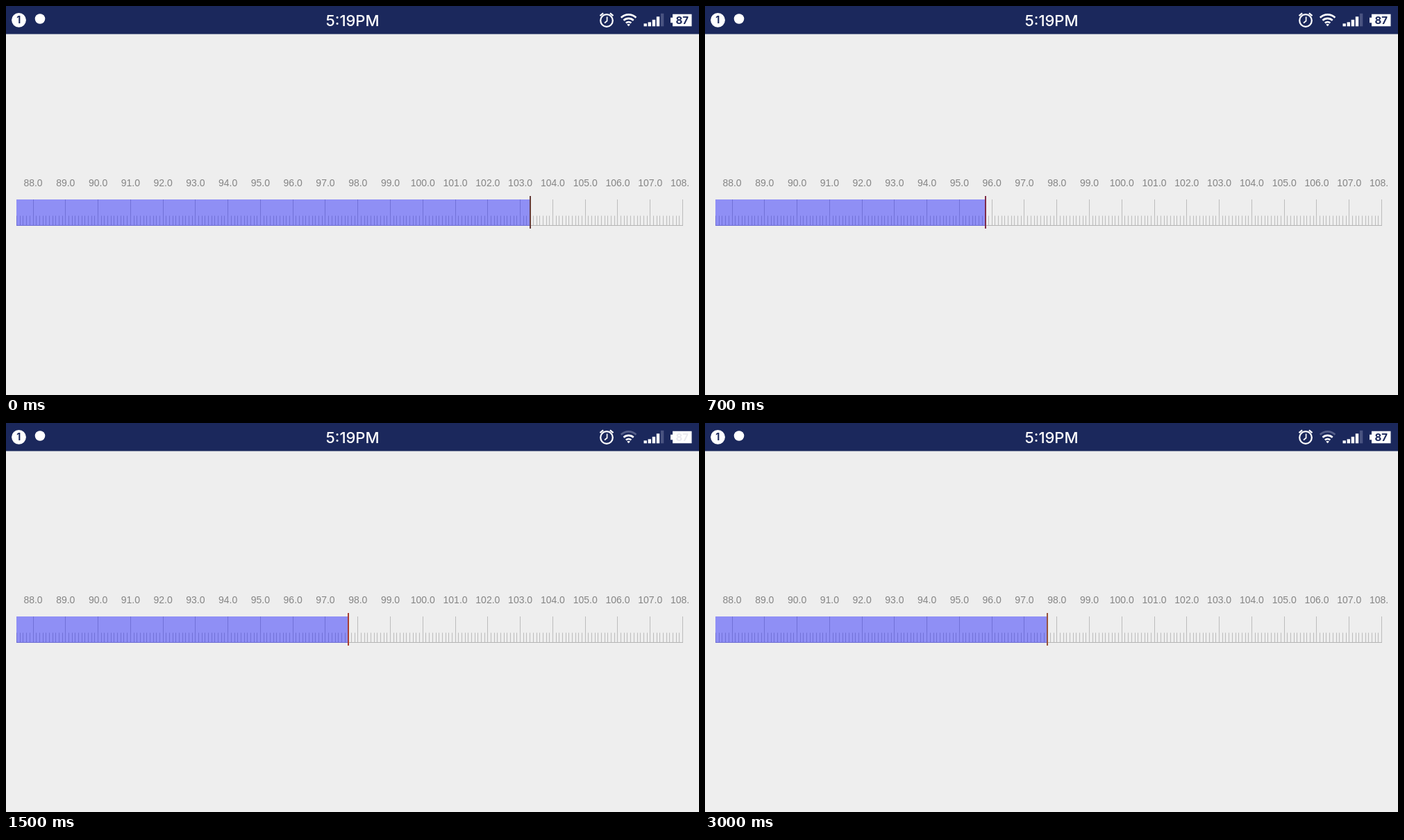
Write an HTML page that moves like this. It is 998 by 561 pixels and loops after 3.4 s.

```html
<!DOCTYPE html>
<html lang="en">
<head>
<meta charset="utf-8">
<title>Tuner scale</title>
<style>
  html, body { margin: 0; width: 100%; height: 100%; overflow: hidden; background: #eee; }
  svg { display: block; width: 998px; height: 561px; }
  .time { font: 500 22px Inter, sans-serif; }
  .badge { font: 700 14px Inter, sans-serif; }
  .charge { font: 700 15px Inter, "Liberation Sans", sans-serif; }
  .labels { font: 14px "Liberation Sans", Arial, sans-serif; fill: #858585; }
  text { text-anchor: middle; }
</style>
</head>
<body>
<svg viewBox="0 0 998 561">
  <defs><clipPath id="view"><rect x="15" y="240" width="968" height="30"/></clipPath></defs>
  <rect width="998" height="561" fill="#eee"/>

  <rect width="998" height="40.5" fill="#1b285c"/>
  <g fill="#fff">
    <circle cx="18.5" cy="20.3" r="10.4"/>
    <text class="badge" x="18.3" y="25.3" fill="#1b285c">1</text>
    <circle cx="49" cy="18.5" r="7.3"/>
    <text class="time" x="499" y="28.6">5:19PM</text>
  </g>

  <g fill="none" stroke="#fff" stroke-width="2.2">
    <circle cx="865" cy="21" r="8.8"/>
    <path d="M855.5 14.2l4.6-3.9M874.5 14.2l-4.6-3.9"/>
    <path d="M865.6 15.5v6l-3.6 3" stroke-width="1.7"/>
  </g>

  <g fill="none" stroke="#fff" stroke-width="2.6">
    <path id="outer" d="M885.8 16.8a15.5 15.5 0 0 1 21.6 0"/>
    <path d="M889.5 20.8a10.2 10.2 0 0 1 14.2 0"/>
    <path d="M892.9 24.5a5.2 5.2 0 0 1 7.4 0"/>
    <path d="M896.6 29.3l-2.3-2.6a3.4 3.4 0 0 1 4.6 0z" fill="#fff" stroke="none"/>
  </g>

  <g id="signal"></g>
  <path d="M960 11.8h27.5v17.4H960v-5h-3v-7.4h3z" fill="#fff"/>
  <text id="charge" class="charge" x="973.7" y="26" fill="#1b285c">87</text>

  <g id="labels" class="labels" clip-path="url(#view)"></g>
  <g id="ticks" fill="#bcbcbc"></g>
  <rect x="15" y="316" width="960" height="1" fill="#b4b4b4"/>
  <rect id="fill" x="15" y="279" height="38" fill="#00f" fill-opacity=".4"/>
  <rect id="needle" y="274" width="2" height="47"/>
</svg>
<script>
const LOOP = 3400, STEP = 100;
const $ = id => document.getElementById(id);
const xOf = mhz => 39 + (mhz - 88) * 46.775;

function add(parent, tag, attrs, text) {
  const el = document.createElementNS("http://www.w3.org/2000/svg", tag);
  for (const k in attrs) el.setAttribute(k, attrs[k]);
  if (text) el.textContent = text;
  $(parent).append(el);
}

for (let i = 875; i <= 1080; i++) {
  const major = i % 10 === 0, x = xOf(i / 10), y = major ? 279 : 302.5;
  add("ticks", "rect", { x: Math.floor(x), y, width: 1, height: 316 - y });
  if (major) add("labels", "text", { x, y: 260.3 }, (i / 10).toFixed(1));
}

[4, 6, 9.5, 14, 18.5].forEach((h, i) => add("signal", "rect", {
  x: 918.5 + i * 6.1, y: 29.3 - h, width: 4.4, height: h,
  fill: i < 4 ? "#fff" : "#495380"
}));

// [ms, frequency]
const path = [
  [0, 103.3], [100, 103.3], [400, 91.2], [500, 91.2], [700, 95.8],
  [900, 97], [1200, 92.1], [1500, 97.7], [LOOP, 97.7]
];
// [from ms, value]
const tints = [
  [0, "#663c38"], [200, "#33282c"], [500, "#802c48"], [800, "#6c3034"],
  [1400, "#a83c30"], [2000, "#6c4444"], [3000, "#96523c"]
];
const charges = [[0, "#1b285c"], [1000, "none"], [1500, "#e9e9ef"], [2000, "#1b285c"]];
const arcs = [[0, "#fff"], [800, "#56608a"]];

const held = (table, t) => table.filter(row => row[0] <= t).pop()[1];

function frequency(t) {
  const i = path.findIndex(p => p[0] > t);
  const [t0, a] = path[i - 1], [t1, b] = path[i];
  return Math.round((a + (b - a) * (t - t0) / (t1 - t0)) * 10) / 10;
}

function draw(now) {
  const t = Math.floor((now % LOOP) / STEP) * STEP;
  const x = xOf(frequency(t));
  $("fill").setAttribute("width", x - 15);
  $("needle").setAttribute("x", Math.floor(x));
  $("needle").setAttribute("fill", held(tints, t));
  $("charge").setAttribute("fill", held(charges, t));
  $("outer").setAttribute("stroke", held(arcs, t));
}

const start = performance.now();
function tick() {
  draw(performance.now() - start);
  requestAnimationFrame(tick);
}
tick();
</script>
</body>
</html>
```
